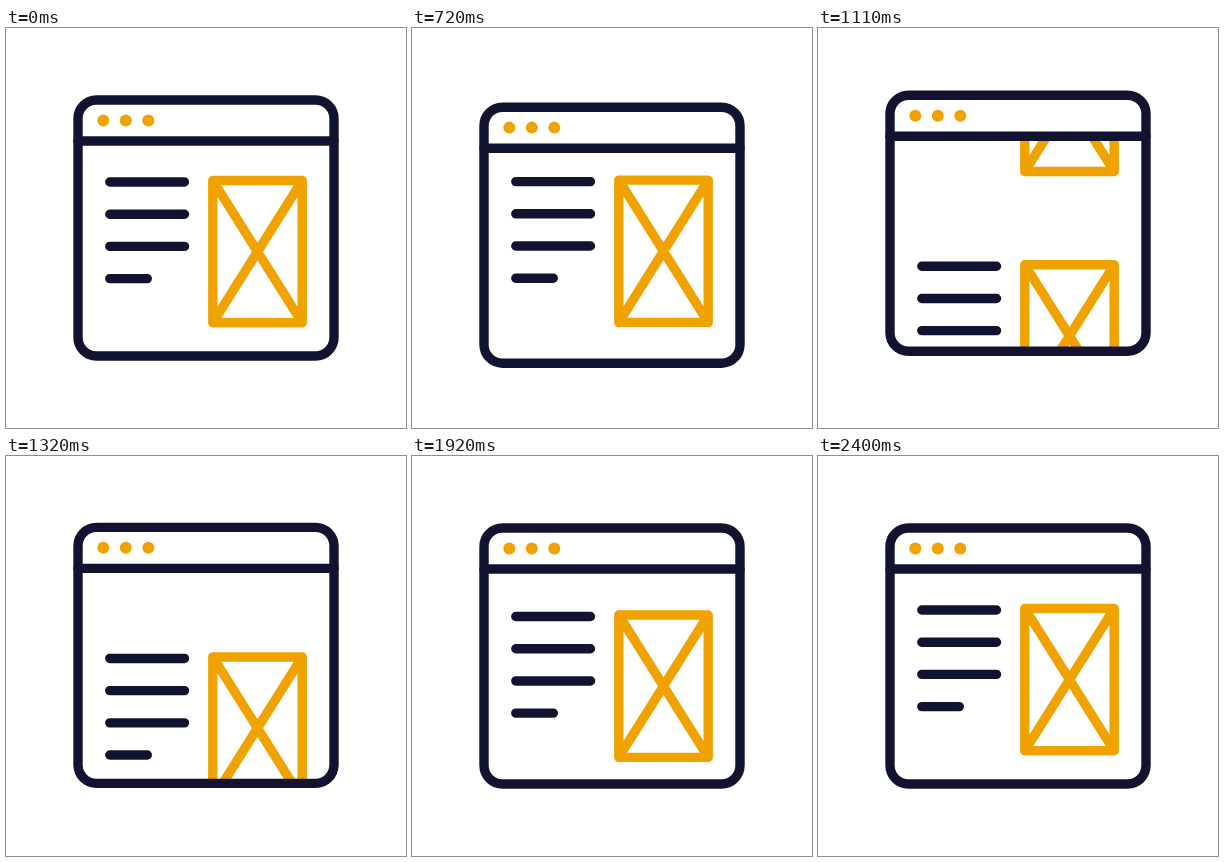
An HTML page for the animation above (5090 ms loop, 400 by 400 pixels).

```html
<!DOCTYPE html>
<html lang="en">
<head>
<meta charset="utf-8">
<title>Scrolling page</title>
<style>
  html, body { margin: 0; height: 100%; overflow: hidden; background: #fff; }
  svg { display: block; width: 100%; height: 100%; }
  .line { fill: none; stroke-width: 9.4; stroke-linecap: round; stroke-linejoin: round; }
  .navy { stroke: #121331; }
  .gold { stroke: #f0a300; }
</style>
</head>
<body>
<svg viewBox="0 0 400 400">
  <defs>
    <clipPath id="view"><rect x="72" y="113" width="256" height="215"/></clipPath>
    <g id="content" class="line">
      <path class="navy" d="M103.8 154H178.5M103.8 186.2H178.5M103.8 218.4H178.5M103.8 250.6H141.3"/>
      <path class="gold" d="M206.8 152.5H296.2V294.8H206.8ZL296.2 294.8M296.2 152.5L206.8 294.8"/>
    </g>
  </defs>
  <g id="window">
    <g clip-path="url(#view)">
      <g id="scroll">
        <use href="#content"/>
        <use href="#content" y="235.5"/>
      </g>
    </g>
    <rect class="line navy" x="72" y="72" width="256" height="256" rx="18.5"/>
    <path class="line navy" d="M72 113H328"/>
    <g fill="#f0a300">
      <circle cx="97.3" cy="92.4" r="6"/>
      <circle cx="119.8" cy="92.4" r="6"/>
      <circle cx="142.3" cy="92.4" r="6"/>
    </g>
  </g>
</svg>
<script>
const LOOP = 5090, STEP = 30, PAGE = 235.5;
const win = document.getElementById('window');
const scroll = document.getElementById('scroll');

// Cubic Bézier easing with handles (1/3, 0) and (x2, 1)
function ease(x, x2) {
  if (x <= 0) return 0;
  if (x >= 1) return 1;
  let lo = 0, hi = 1, s;
  for (let i = 0; i < 30; i++) {
    s = (lo + hi) / 2;
    const r = 1 - s;
    if (r * r * s + 3 * x2 * r * s * s + s ** 3 < x) lo = s; else hi = s;
  }
  return s * s * (3 - 2 * s);
}

const part = (t, start, end, x2) => ease((t - start) / (end - start), x2);

function draw(now) {
  const t = Math.floor(now % LOOP / STEP) * STEP;
  const bob = 13.2 * part(t, 0, 560, 0)
    - 19.9 * part(t, 560, 1000, 2 / 3)
    + 6.7 * part(t, 1000, 1570, 0);
  const shift = t < 2400 ? -PAGE * part(t, 560, 2400, 0) : 0;
  win.setAttribute('transform', `translate(0 ${bob.toFixed(3)})`);
  scroll.setAttribute('transform', `translate(0 ${shift.toFixed(3)})`);
}

const begin = performance.now();
function tick() {
  draw(performance.now() - begin);
  requestAnimationFrame(tick);
}
tick();
</script>
</body>
</html>
```
